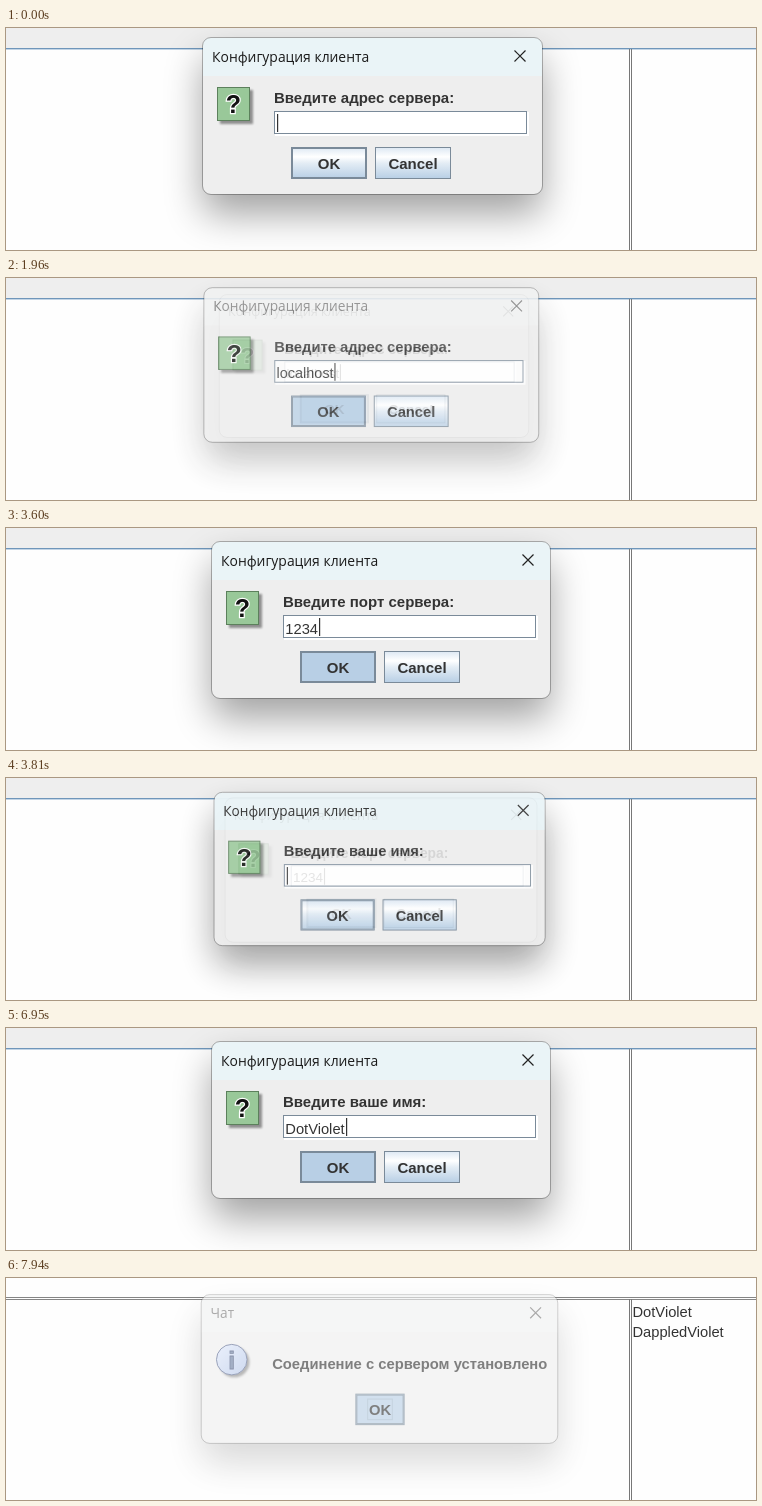
An HTML page that plays this animation: 750 px wide and 222 px high, repeating every 8000 ms.

```html
<!DOCTYPE html>
<html lang="ru">
<head>
<meta charset="utf-8">
<title>Чат</title>
<style>
  html, body { margin: 0; width: 100%; height: 100%; overflow: hidden; background: #fff; }
  svg { display: block; width: 750px; height: 222px; }
  text { font: 14.7px "Liberation Sans", Arial, sans-serif; fill: #333; white-space: pre; }
  .bold { font-weight: bold; font-size: 15px; }
  .title { font: 13.9px "Open Sans", "Noto Sans", sans-serif; fill: #1a1a1a; }
  .cross { stroke: #222; stroke-width: 1.2; fill: none; }
  .bar { fill: #eaf4f7; }
  .idle .bar { fill: #f1f2f2; }
  .idle .title { fill: #777; }
  .idle .cross { stroke: #777; }
  .idle .shadow { opacity: .24; }
  .shadow { opacity: .36; filter: url(#soft); }
  .frame { fill: none; stroke: #000; stroke-opacity: .28; }
  .mark { font: bold 25px "Liberation Sans", Arial, sans-serif; text-anchor: middle; }
</style>
</head>
<body>
<svg viewBox="0 0 750 222">
  <defs>
    <linearGradient id="metal" x2="0" y2="1">
      <stop offset="0" stop-color="#dde8f3"/>
      <stop offset=".3" stop-color="#fff"/>
      <stop offset=".5" stop-color="#e4edf5"/>
      <stop offset="1" stop-color="#b8cfe5"/>
    </linearGradient>
    <linearGradient id="glass" x2="1" y2="1">
      <stop offset="0" stop-color="#dfe8fa"/>
      <stop offset="1" stop-color="#b3c5e8"/>
    </linearGradient>
    <filter id="soft" x="-40%" y="-70%" width="180%" height="240%"><feGaussianBlur stdDeviation="19"/></filter>
    <filter id="small" x="-30%" y="-30%" width="160%" height="160%"><feGaussianBlur stdDeviation="1.3"/></filter>
  </defs>
  <g id="stage"></g>
</svg>
<script>
const LOOP = 8000;
const stage = document.getElementById('stage');

const dialogs = {
  host: { x: 197, y: 10, w: 339, h: 156, label: 'Введите адрес сервера:', value: 'localhost' },
  port: { x: 206, y: 14, w: 338, h: 156, label: 'Введите порт сервера:', value: '1234' },
  name: { x: 206, y: 14, w: 338, h: 156, label: 'Введите ваше имя:', value: 'DotViolet' },
  chat: { x: 194, y: 17, w: 361, h: 150, label: 'Соединение с сервером установлено' }
};

// Times at which each next character count is shown.
const typing = {
  host: [[200, 2], [400, 3], [530, 4], [730, 5], [1000, 6], [1200, 7], [1330, 8], [1530, 9]],
  port: [[2810, 1], [2940, 2], [3140, 3], [3340, 4]],
  name: [[4480, 1], [4810, 2], [5010, 3], [5340, 4], [5610, 5], [5870, 6], [6210, 7], [6480, 8], [6610, 9]]
};
const caretFrom = { host: 0, port: 2740, name: 3740 };

const pose = (id, scale = 1, alpha = 1, look = '', dx = 0, dy = 0) => ({ id, scale, alpha, look, dx, dy });
const closing = (id, alpha) => pose(id, .985, alpha, 'idle pressed', -1.2, -1);
const opening = (id, scale, alpha) => pose(id, scale, alpha, '', -1.4, -1);
const ghost = (id, scale, alpha) => pose(id, scale, alpha, 'idle pressed', 0, 0);

const scenes = [
  [0, pose('host')],
  [1810, pose('host', 1, 1, 'pressed')],
  [1960, closing('host', .86), pose('host', .91, .13, 'idle pressed', 1.5)],
  [2010, ghost('host', .91, .4)],
  [2080, opening('port', .93, .45)],
  [2150, opening('port', .98, .92)],
  [2210, pose('port')],
  [3600, pose('port', 1, 1, 'pressed')],
  [3670, closing('port', .85)],
  [3740, ghost('port', .93, .4), opening('name', .93, .3)],
  [3810, opening('name', .977, .96), ghost('port', .92, .12)],
  [3880, opening('name', .99, 1)],
  [3950, pose('name')],
  [6950, pose('name', 1, 1, 'pressed')],
  [7010, closing('name', .85)],
  [7080, ghost('name', .95, .45), opening('chat', .93, .2)],
  [7140, opening('chat', .983, .96), pose('name', .94, .15, 'idle pressed', -3, -1)],
  [7210, opening('chat', .993, 1)],
  [7280, pose('chat')],
  [7810, pose('chat', 1, 1, 'pressed')],
  [7940, pose('chat', .985, .62, 'idle pressed', -1, -1)]
];

const latest = (list, t) => list.filter(([start]) => start <= t).pop();
const box = (x, y, w, h, attrs) => `<rect x="${x}" y="${y}" width="${w}" height="${h}" ${attrs}/>`;
const label = (x, y, content, attrs = '') => `<text x="${x}" y="${y}" ${attrs}>${content}</text>`;

const ruler = document.createElement('canvas').getContext('2d');
ruler.font = '14.7px "Liberation Sans", Arial, sans-serif';

function button(x, y, w, caption, { main, pressed, focus } = {}) {
  const fill = main && pressed ? '#b8cfe5' : 'url(#metal)';
  const edge = 'stroke="#7a8a99"';
  return box(x + .5, y + .5, w - 1, 31, `fill="${fill}" ${edge}`)
    + (main ? box(x + 1.5, y + 1.5, w - 3, 29, `fill="none" ${edge}`) : '')
    + (focus ? box(x + 12.5, y + 5.5, w - 25, 21, 'fill="none" stroke="#a3b8cc"') : '')
    + label(x + w / 2, y + 22, caption, 'class="bold" text-anchor="middle"');
}

function field(id, value, t) {
  const shown = value.slice(0, latest([[0, 0], ...typing[id]], t)[1]);
  const caretX = Math.round(73.3 + ruler.measureText(shown).width);
  return box(72, 74, 254, 24, 'fill="#fff"')
    + box(71.5, 73.5, 252, 22, 'fill="#fff" stroke="#7a8a99"')
    + label(73.3, 91.5, shown)
    + (t >= caretFrom[id] ? box(caretX + 1, 76, 1.2, 18, 'fill="#333"') : '');
}

const questionIcon = box(17, 52, 33, 34, 'fill="#000" opacity=".4" filter="url(#small)"')
  + box(14.5, 49.5, 32, 33, 'fill="#99c899" stroke="#5c805c"')
  + label(30.5, 75, '?', 'class="mark" style="fill:#111;stroke:#fff;stroke-width:2.4;paint-order:stroke"');

const infoIcon = '<circle cx="33" cy="68" r="15.5" opacity=".4" filter="url(#small)"/>'
  + '<circle cx="30.5" cy="65.5" r="15.5" fill="url(#glass)" stroke="#5d6a90"/>'
  + label(30.5, 74.5, 'i', 'class="mark" style="fill:#6c7fa3;stroke:#46557a;stroke-width:.8"');

function dialog({ id, scale, alpha, look, dx, dy }, t) {
  const { x, y, w, h, label: message, value } = dialogs[id];
  const pressed = look.includes('pressed');
  const isChat = id === 'chat';
  const cx = w / 2, cy = h / 2, close = w - 22;
  const content = isChat
    ? infoIcon + label(71.5, 75.5, message, 'class="bold"')
      + button(156, 100, 50, 'OK', { main: true, pressed, focus: true })
    : questionIcon + label(71, 65, message, 'class="bold"') + field(id, value, t)
      + button(88, 109, 76, 'OK', { main: true, pressed })
      + button(172, 109, 76, 'Cancel');
  return `<g class="${look}" opacity="${alpha}"
    transform="translate(${x + cx + dx} ${y + cy + dy}) scale(${scale}) translate(${-cx} ${-cy})">`
    + box(0, 20, w, h, 'rx="8" class="shadow"')
    + box(0, 0, w, h, 'rx="8" fill="#eee"')
    + `<path class="bar" d="M0 38V8q0-8 8-8H${w - 8}q8 0 8 8V38z"/>`
    + box(-.5, -.5, w + 1, h + 1, 'rx="8.5" class="frame"')
    + label(9, 23.5, isChat ? 'Чат' : 'Конфигурация клиента', 'class="title"')
    + `<path class="cross" d="M${close - 5.5} 12.5l11 11m0-11l-11 11"/>`
    + content + '</g>';
}

function backdrop(t) {
  const connected = t >= 7080;
  const top = connected
    ? box(0, 19, 750, 1, 'fill="#858585"') + box(0, 21, 750, 1, 'fill="#858585"')
    : box(0, 0, 750, 20, 'fill="#eee"') + box(0, 20, 750, 1, 'fill="#6f96ba"')
      + box(0, 21, 750, 1, 'fill="#c3d5e6"');
  const split = box(623, 21, 1, 201, 'fill="#777"') + box(624, 22, 1, 200, 'fill="#fff"')
    + box(625, 21, 1, 201, 'fill="#777"');
  const members = t >= 7880 ? label(626.5, 39, 'DotViolet') + label(626.5, 59, 'DappledViolet') : '';
  return box(0, 0, 750, 222, 'fill="#fefefe"') + top + split + members;
}

let previous = '';
function draw(now) {
  const t = now % LOOP;
  const [, ...poses] = latest(scenes, t);
  const markup = backdrop(t) + poses.map(p => dialog(p, t)).join('');
  if (markup !== previous) stage.innerHTML = previous = markup;
}

const began = performance.now();
function tick() {
  draw(performance.now() - began);
  requestAnimationFrame(tick);
}
tick();
</script>
</body>
</html>
```
